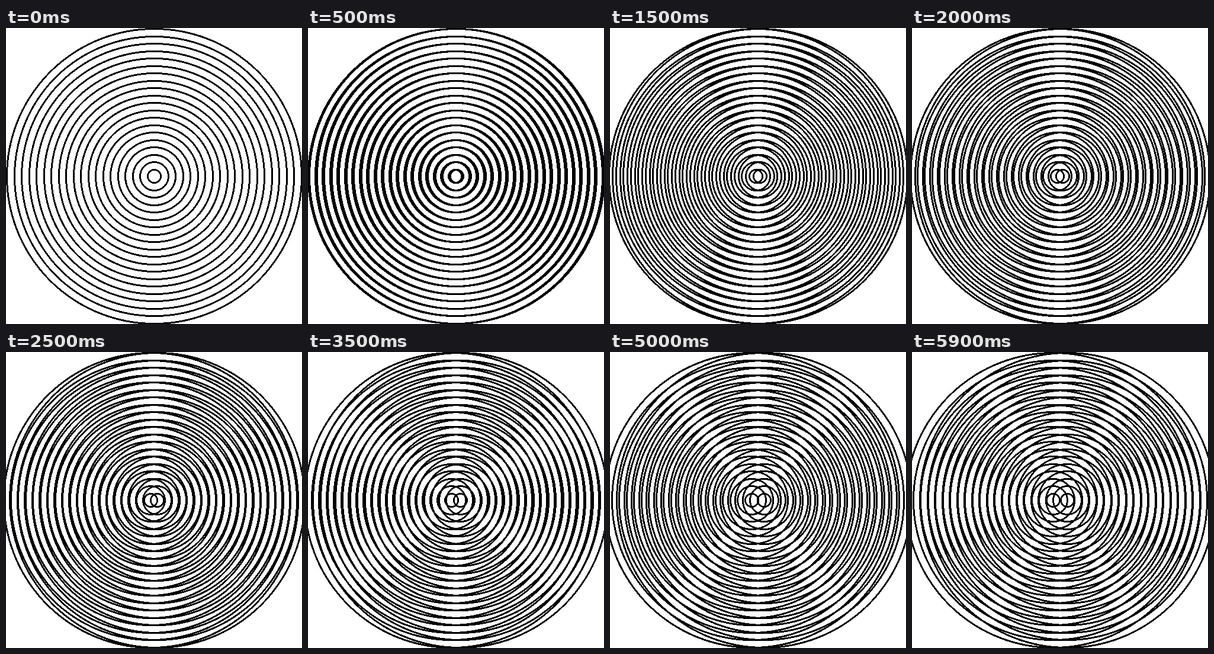
An HTML page with a canvas that plays this animation: 500 px wide and 500 px high, repeating every 6 s.

```html
<!DOCTYPE html>
<html>
<head>
<meta charset="utf-8">
<style>
  html, body { margin: 0; width: 100%; height: 100%; overflow: hidden; background: #fff; }
  canvas { display: block; }
</style>
</head>
<body>
<canvas width="500" height="500"></canvas>
<script>
const SIZE = 500, MID = 250, RINGS = 20, LINE = 3;
const STEPS = 60, STEP_MS = 100, TRAVEL = 12;
const ctx = document.querySelector('canvas').getContext('2d');
const img = ctx.createImageData(SIZE, SIZE);
const pixels = new Uint32Array(img.data.buffer);

// Hard-edged ellipse outline inside the box x0..x1, y0..y1 (pixel indices, inclusive).
function outline(x0, y0, x1, y1) {
  const a = (x1 - x0) / 2, b = (y1 - y0) / 2;
  const cx = x0 + a, cy = y0 + b;
  const ai = a - LINE + 1, bi = b - LINE + 1;
  const right = Math.min(x1, SIZE - 1), bottom = Math.min(y1, SIZE - 1);
  for (let y = Math.max(y0, 0); y <= bottom; y++) {
    const v = Math.abs(y - cy);
    for (let x = Math.max(x0, 0); x <= right; x++) {
      const u = Math.abs(x - cx);
      // Allow half a pixel along the longer axis, like a rounded one-pixel curve.
      const hx = u >= v ? 0.5 : 0, hy = 0.5 - hx;
      const inOuter = ((u - hx) / a) ** 2 + ((v - hy) / b) ** 2 <= 1;
      if (inOuter && ((u + hx) / ai) ** 2 + ((v + hy) / bi) ** 2 >= 1) {
        pixels[y * SIZE + x] = 0xff000000;
      }
    }
  }
}

function rings(shift) {
  for (let k = 1; k <= RINGS; k++) {
    const r = Math.floor(MID * k / RINGS);
    outline(Math.trunc(MID + shift - r), MID - r, Math.trunc(MID + shift + r), MID + r);
  }
}

const start = performance.now();
let shown = -1;
function tick() {
  const step = Math.floor((performance.now() - start) / STEP_MS) % STEPS;
  const shift = TRAVEL * step / (STEPS - 1);
  // Box edges snap to whole pixels, so many steps look alike.
  const pose = Math.floor(shift) + Math.ceil(shift);
  if (pose !== shown) {
    shown = pose;
    pixels.fill(0xffffffff);
    rings(-shift);
    rings(shift);
    ctx.putImageData(img, 0, 0);
  }
  requestAnimationFrame(tick);
}
tick();
</script>
</body>
</html>
```
